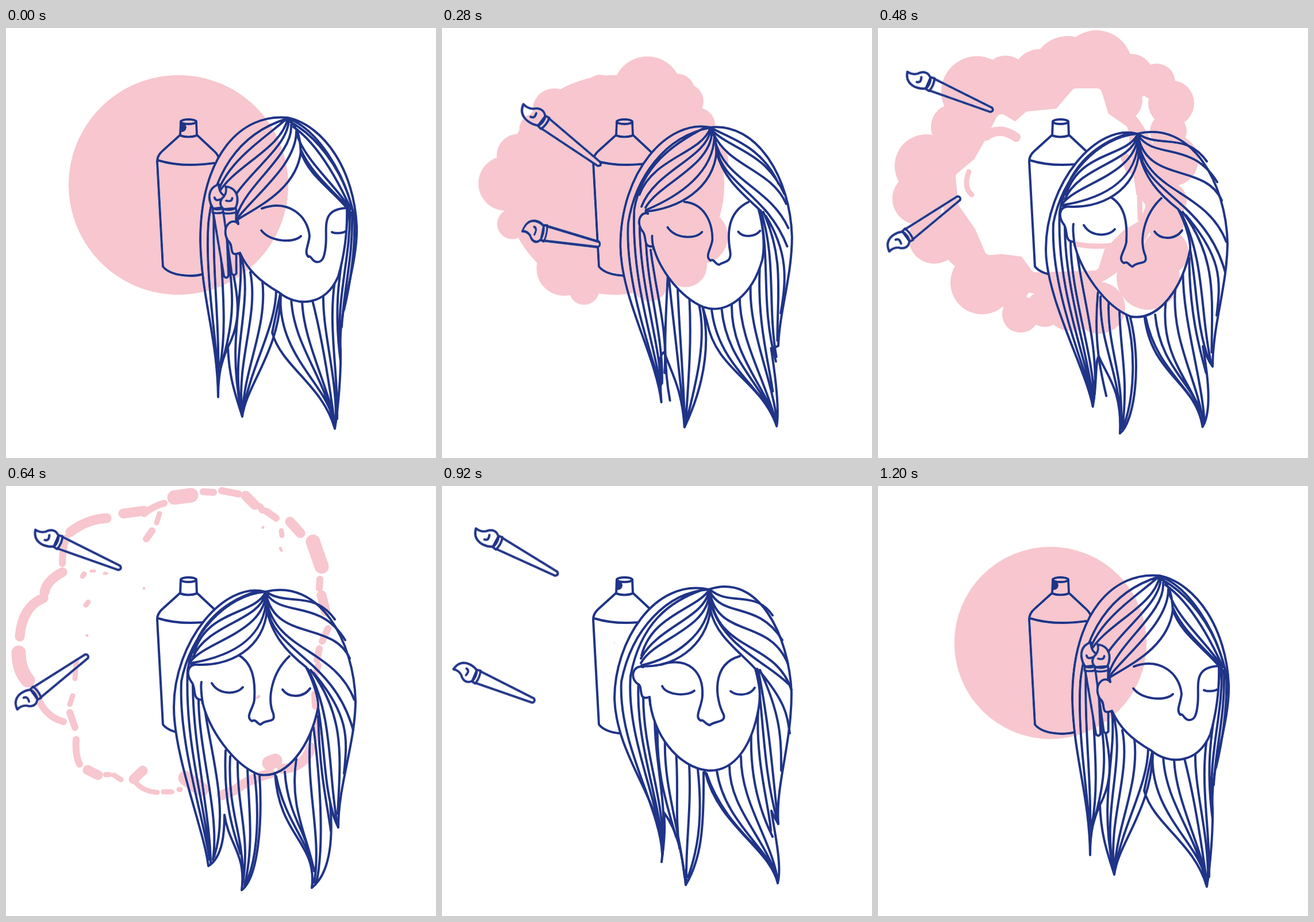
An HTML page without scripts for the animation above (1240 ms loop, 748x748 px).

```html
<!DOCTYPE html>
<html lang="en">
<head>
<meta charset="utf-8">
<title>Spray can and brushes</title>
<style>
html, body { margin: 0; height: 100%; overflow: hidden; background: #fff; }
svg { display: block; width: 100vw; height: 100vh; }
.ink { fill: none; stroke: #203488; stroke-width: 4; stroke-linecap: round; stroke-linejoin: round; }
.solid { fill: #fff; }
.ink path { vector-effect: non-scaling-stroke; }
.pink { fill: #f7c6ce; mix-blend-mode: darken; }
.puff { fill: none; stroke: #f7c6ce; stroke-linecap: round; stroke-linejoin: round; }
.mane, .left, .right, .crown, .part, .face, .look, .b1, .b2, .spot, .disc, .hole, .near, .far, .bits path {
  animation: 1240ms linear infinite;
}
.mane { animation-name: mane; }
.left { animation-name: left; }
.right { animation-name: right; }
.crown { animation-name: crown; }
.part { animation-name: part; }
.face { animation-name: face; }
.look { animation-name: look; }
.b1 { animation-name: b1; }
.b2 { animation-name: b2; }
.spot { animation-name: spot; }
.disc { animation-name: disc; transform-origin: 300px 273px; }
.hole { animation-name: hole; transform-origin: 290px 268px; }
.near { animation-name: near; transform-origin: 300px 273px; }
.far { animation-name: far; transform-origin: 290px 270px; }
.bits path { animation-name: bits; transform-origin: 288px 275px; }

/* hair: turned, front, swung, returning */
@keyframes mane {
  0%, 12.9%, 93.54%, to { animation-timing-function: steps(5); d: path("M490 156C410 148 338 220 338 370C340 470 368 540 369 642C369 600 375 580 386 555C388 610 400 640 411 676C418 620 478 560 478 458L463 530C480 590 550 620 572 697C578 660 583 600 582 560C581 545 582 520 585 505C588 470 612 400 610 345C606 250 555 170 490 156"); }
  29.03% { animation-timing-function: steps(7); d: path("M451 184C380 165 292 270 292 385C292 470 375 590 390 657C384 590 376 560 387 570C405 590 430 620 429 707C450 690 470 590 437 503L460 500C475 600 560 610 589 690C594 660 575 590 566 555C572 568 578 578 585 585C586 510 607 450 608 375C606 270 545 160 451 184"); }
  51.61% { animation-timing-function: steps(7); d: path("M451 184C380 165 292 270 292 385C292 470 345 600 352 661C378 645 380 600 380 572C388 625 418 640 410 703C440 680 446 580 441 503L468 500C475 610 542 620 532 699C568 670 568 600 564 552C568 570 574 586 578 594C578 520 607 450 608 375C606 270 545 160 451 184"); }
  74.19% { animation-timing-function: steps(6); d: path("M464 180C370 160 300 270 300 370C304 480 395 560 382 654C388 610 388 590 386 568C410 600 418 640 424 694C450 650 456 600 455 498L458 498C480 590 570 630 584 691C592 660 578 600 573 565C577 575 582 582 585 588C580 520 608 450 608 360C604 260 550 150 464 180"); }
}
@keyframes left {
  0%, 12.9%, 93.54%, to { animation-timing-function: steps(5); d: path("M488 158C400 185 360 260 352 340C346 430 366 540 369 610M488 158C440 200 372 240 362 310C358 420 372 520 369 600M372 350C376 450 385 520 372 590M385 385C395 460 400 500 375 585M390 395C400 460 415 500 386 555M407 392C415 470 385 540 408 660M410 400C430 480 390 560 409 665M425 425C440 500 400 580 411 670M446 440C455 520 415 590 412 665M470 455C470 520 425 590 413 665"); }
  29.03% { animation-timing-function: steps(7); d: path("M451 184C380 190 320 260 305 340C300 450 360 570 388 640M440 182C380 200 330 240 316 320C310 450 365 560 388 640M325 345C325 450 370 550 388 640M335 370C335 460 375 560 388 640M345 380C355 470 378 540 388 630M383 460C372 540 382 600 389 640M385 465C385 540 425 590 429 690M400 475C395 550 432 600 430 700M420 490C420 560 440 600 432 700M432 500C455 560 452 640 434 695"); }
  51.61% { animation-timing-function: steps(7); d: path("M451 184C380 190 320 260 305 340C300 450 345 580 354 650M440 182C380 200 330 240 316 320C310 450 350 570 355 650M325 345C325 450 355 570 356 655M335 370C335 460 372 570 360 650M345 380C352 450 390 560 362 645M382 460C378 550 395 600 408 640M390 470C385 560 410 600 412 670M403 480C402 560 425 610 412 690M420 490C422 560 432 620 415 695M432 498C440 560 440 640 418 690"); }
  74.19% { animation-timing-function: steps(6); d: path("M464 180C390 185 330 250 312 340C306 450 380 560 383 640M455 180C395 200 345 240 328 330C320 440 380 550 384 640M342 340C335 450 385 560 383 640M350 365C350 460 385 540 385 630M370 400C370 470 386 530 386 600M375 410C372 500 390 550 407 610M388 440C385 520 412 590 422 680M407 460C412 530 405 570 413 630M430 485C434 560 424 620 425 685M445 493C452 560 450 620 428 680"); }
}
@keyframes right {
  0%, 12.9%, 93.54%, to { animation-timing-function: steps(5); d: path("M478 458C470 560 545 610 566 670M496 470C500 550 550 600 568 680M515 470C515 540 560 620 571 685M532 470C545 520 560 600 572 690M552 460C550 530 575 600 574 685M572 440C560 520 578 600 576 680M595 315C592 390 565 450 582 580M598 316C600 400 575 460 581 560M602 320C604 400 588 450 584 520M606 330C608 380 600 440 588 490"); }
  29.03% { animation-timing-function: steps(7); d: path("M462 500C480 590 545 620 580 675M480 500C490 590 550 620 585 680M497 480C490 580 560 620 587 682M508 462C500 560 560 610 588 685M527 430C520 520 570 600 589 685M540 400C540 500 560 560 575 600M522 315C560 400 545 500 580 580M525 318C570 400 560 500 582 580M530 320C590 400 580 470 583 560M535 325C600 400 598 440 590 500"); }
  51.61% { animation-timing-function: steps(7); d: path("M470 505C485 580 520 610 533 660M485 497C490 570 520 600 528 640M505 475C492 560 525 610 536 670M530 430C520 520 550 610 536 690M535 420C545 500 555 620 540 690M543 400C545 500 560 560 565 600M522 315C560 400 545 500 572 580M525 318C570 400 560 500 576 585M530 320C590 400 582 470 577 570M535 325C598 400 594 440 588 500"); }
  74.19% { animation-timing-function: steps(6); d: path("M460 500C490 590 560 630 578 670M478 495C490 580 565 630 580 675M500 487C500 560 560 610 582 680M520 470C520 550 570 610 583 680M538 430C535 520 560 580 575 610M550 390C545 480 570 560 572 600M548 318C560 420 560 500 584 585M550 320C570 420 575 500 583 570M553 320C590 400 590 440 590 495M555 325C600 380 600 400 605 430"); }
}
@keyframes crown {
  0%, 12.9%, 93.54%, to { animation-timing-function: steps(5); d: path("M490 157C480 210 395 240 368 290M492 160C490 215 400 260 380 330M496 168C500 220 420 270 402 325M505 180C505 235 440 285 403 330"); }
  29.03%, 64.51% { animation-timing-function: steps(3); d: path("M451 186C430 225 350 215 327 290M451 188C440 235 350 240 325 298M452 190C445 255 350 270 322 304M453 195C450 260 400 295 322 308"); }
  74.19% { animation-timing-function: steps(6); d: path("M464 182C440 215 365 225 347 295M464 184C455 230 375 245 346 300M465 188C460 250 370 265 346 308M466 195C465 260 400 300 347 312"); }
}
@keyframes part {
  0%, 12.9%, 93.54%, to { animation-timing-function: steps(5); d: path("M490 157C540 175 590 250 606 330M494 163C535 185 585 240 604 320M500 172C540 200 575 260 600 315M506 185C520 230 570 270 597 312M513 212C530 250 560 275 595 312M490 157C510 175 512 195 513 220"); }
  29.03%, 64.51% { animation-timing-function: steps(3); d: path("M452 184C490 210 535 180 572 232M452 186C480 230 545 195 590 268M453 190C470 270 570 235 598 300M453 198C470 290 570 280 606 372M454 210C465 290 570 300 604 425M451 184C453 195 454 205 454 235"); }
  74.19% { animation-timing-function: steps(6); d: path("M466 180C500 210 545 180 575 225M466 184C490 230 550 200 592 268M467 190C485 265 570 230 602 310M468 198C485 290 580 270 608 355M469 208C490 280 570 310 603 345M464 180C466 195 467 205 468 235"); }
}
@keyframes face {
  0%, 12.9%, 93.54%, to { animation-timing-function: steps(5); d: path("M403 333C440 310 505 280 513 215C525 255 565 280 593 313C594 350 590 390 578 432C555 485 505 485 475 460C440 440 420 420 407 391C385 400 398 378 386 370C372 345 395 328 404 341Z"); }
  29.03%, 64.51% { animation-timing-function: steps(3); d: path("M322 310C390 318 450 280 454 215C462 260 490 290 522 315C535 340 544 370 543 385C530 450 490 510 440 502C395 485 350 420 341 372C322 372 332 350 322 340C312 325 318 312 328 311Z"); }
  74.19% { animation-timing-function: steps(6); d: path("M347 313C400 318 460 280 467 215C475 260 520 290 545 318C552 345 555 360 551 385C540 450 510 497 463 495C410 490 365 430 361 367C340 375 350 350 342 345C325 335 332 310 350 315Z"); }
}
@keyframes look {
  0%, 12.9%, 93.54%, to { animation-timing-function: steps(5); d: path("M445 314C490 298 525 325 528 362C526 380 518 390 526 398C530 394 532 406 540 407C550 408 554 400 556 380C560 350 545 315 593 313M444 352C460 372 500 375 513 362M567 355C572 358 585 357 590 354M404 392C405 392 406 393 407 395"); }
  29.03%, 64.51% { animation-timing-function: steps(3); d: path("M406 295C430 310 434 340 432 372C430 388 415 402 428 409C434 404 438 415 443 415C452 404 470 414 465 396C454 370 462 325 493 296M358 343C370 363 400 364 412 350M481 354C492 370 518 368 529 352M340 341C338 350 341 370 342 378"); }
  74.19% { animation-timing-function: steps(6); d: path("M380 311C430 295 455 325 453 365C452 385 438 402 450 408C455 405 458 415 466 416C475 408 494 412 490 398C475 370 468 310 518 296M383 348C390 365 428 366 439 356M502 357C512 365 535 366 544 351M361 367C361 370 362 375 362 380"); }
}

/* brushes */
@keyframes b1 {
  0%, 3.22%, 93.54%, to { animation-timing-function: steps(3); transform: translate(371px, 316px) rotate(84deg) scale(1, 1); }
  12.9% { animation-timing-function: steps(5); transform: translate(308px, 263px) rotate(59.5deg) scale(1.12, 1); }
  29.03% { animation-timing-function: steps(3); transform: translate(88px, 97px) rotate(22deg) scale(1, 1); }
  38.7%, 51.61% { animation-timing-function: steps(7); transform: translate(90px, 97px) rotate(23deg) scale(1, 1); }
  74.19% { animation-timing-function: steps(6); transform: translate(96px, 98px) rotate(28deg) scale(1, 1); }
}
@keyframes b2 {
  0%, 3.22%, 93.54%, to { animation-timing-function: steps(3); transform: translate(389px, 317px) rotate(86deg) scale(.95, -1); }
  12.9% { animation-timing-function: steps(5); transform: translate(346px, 350px) rotate(67deg) scale(.75, -1.3); }
  29.03% { animation-timing-function: steps(3); transform: translate(64px, 361px) rotate(-25deg) scale(.9, -1.1); }
  38.7%, 51.61% { animation-timing-function: steps(7); transform: translate(51px, 361px) rotate(-36deg) scale(.95, -1); }
  74.19% { animation-timing-function: steps(6); transform: translate(59px, 331px) rotate(23deg) scale(.93, -1); }
}
@keyframes spot {
  0%, 64.51%, to { animation-timing-function: step-end; opacity: 1; }
  16.12% { animation-timing-function: step-end; opacity: 0; }
}

/* spray: disc, cloud, ring, scraps */
@keyframes disc {
  0% { animation-timing-function: step-end; transform: scale(1); }
  41.93% { animation-timing-function: step-end; transform: scale(0); }
  74.19% { animation-timing-function: steps(8); transform: scale(.006); }
  to { transform: scale(1); }
}
@keyframes hole {
  0% { animation-timing-function: step-end; transform: scale(0); }
  29.03% { animation-timing-function: steps(3); transform: scale(.12); }
  38.7%, 41.93% { animation-timing-function: step-end; transform: scale(1); }
  74.19%, to { transform: scale(0); }
}
@keyframes near {
  0% { animation-timing-function: step-end; visibility: hidden; transform: scale(.7); }
  12.9% { animation-timing-function: steps(5); visibility: visible; transform: scale(.7); }
  29.03% { animation-timing-function: steps(2); visibility: visible; transform: scale(1); }
  35.47%, to { visibility: hidden; transform: scale(1.06); }
}
@keyframes far {
  0% { animation-timing-function: step-end; visibility: hidden; transform: scale(.96); }
  35.47% { animation-timing-function: step-end; visibility: visible; transform: scale(.97); }
  38.7% { animation-timing-function: step-end; visibility: visible; transform: scale(1); }
  41.93%, to { visibility: hidden; transform: scale(1); }
}
@keyframes bits {
  0% { animation-timing-function: step-end; visibility: hidden; stroke-width: 0px; transform: scale(.9); }
  41.93% { animation-timing-function: steps(3); visibility: visible; stroke-width: calc(var(--w) * 3); transform: scale(.9); }
  51.61% { animation-timing-function: steps(4); visibility: visible; stroke-width: var(--w); transform: scale(1); }
  64.51%, to { visibility: hidden; stroke-width: 0px; transform: scale(1.03); }
}
</style>
</head>
<body>
<svg viewBox="0 0 748 748">
  <defs>
    <g id="brush">
      <path d="M4-11L116-4Q122 0 116 4L4 11Z"/>
      <path d="M-3-10C-10-18-20-16-26-8Q-34-2-44-4Q-40 14-22 15Q-10 15-3 10Z"/>
      <path d="M-3-11Q2 0-3 11L4 12Q8 0 4-12ZM-22 6Q-14 5-18-5"/>
    </g>
    <mask id="ring" maskUnits="userSpaceOnUse" x="0" y="0" width="748" height="748">
      <path fill="#fff" d="M0 0H748V748H0Z"/>
      <path class="hole" stroke="#000" stroke-width="20" stroke-linejoin="round" d="M215 160L240 175L262 155L315 150L345 115L380 115L392 155L425 178L432 240L440 295L455 310L448 328L420 345L385 380L375 412L275 415L255 388L215 383L195 385L178 345L150 305L145 260L175 235L195 200Z"/>
    </mask>
  </defs>

  <g class="ink">
    <path d="M303 186L272 214Q263 222 263 232L273 415Q285 430 320 431Q345 431 361 420L371 232Q371 222 362 214L332 186M264 230Q305 243 362 235"/>
    <path d="M304 163L303 187Q317 192 332 187L331 163"/>
    <ellipse cx="317.500" cy="163" rx="13.500" ry="4"/>
    <path class="spot" fill="#203488" d="M305 168Q312 167 312 173Q311 179 305 179Z"/>
    <path class="mane solid"/>
    <path class="left"/>
    <path class="right"/>
    <path class="crown"/>
    <path class="part"/>
    <g class="solid">
      <use class="b1" href="#brush"/>
      <use class="b2" href="#brush"/>
    </g>
    <path class="face solid"/>
    <path class="look"/>
  </g>

  <g class="pink">
    <g mask="url(#ring)">
      <circle class="disc" cx="300" cy="273" r="191"/>
      <g class="puff near">
        <path stroke-width="136" d="M365 87h0"/>
        <path stroke-width="108" d="M85 270h0M200 438h0M470 375h0"/>
        <path stroke-width="86" d="M181 125h0M110 215h0M440 432h0"/>
        <path stroke-width="70" d="M424 88h0M441 108h0M464 155h0M490 225h0M370 468h0M163 390h0M480 300h0"/>
        <path stroke-width="60" d="M272 85h0M240 480h0M98 350h0M142 162h0M300 460h0"/>
        <path stroke-width="40" d="M213 97h0"/>
      </g>
      <g class="puff far">
        <path stroke-width="124" d="M172 111h0M380 66h0M330 76h0"/>
        <path stroke-width="110" d="M84 240h0M181 443h0M470 435h0"/>
        <path stroke-width="90" d="M280 82h0M70 297h0M98 365h0M222 440h0M335 482h0M385 487h0M512 230h0"/>
        <path stroke-width="80" d="M222 88h0M510 131h0M132 172h0M155 380h0M420 125h0M500 390h0M440 85h0"/>
        <path stroke-width="64" d="M485 94h0M248 498h0M290 488h0M505 300h0M505 180h0M500 340h0"/>
      </g>
    </g>
    <g class="puff far">
      <path stroke-width="16" d="M188 188Q212 170 240 190M430 225L438 245"/>
      <path stroke-width="9" d="M158 250Q148 278 163 290M455 295L456 332M345 376Q375 382 410 378"/>
    </g>
    <g class="puff bits">
      <path style="--w:25px" d="M293 20L322 16M534 97L549 140M458 482L468 478M312 508L340 528M22 290Q22 320 38 338"/>
      <path style="--w:17px" d="M494 62L512 82M417 17L433 33M549 190L556 218M530 455Q520 490 480 492M460 500Q420 510 400 528L375 538M222 510L238 495M142 494L160 503M24 262Q28 210 65 195M67 185Q70 165 98 150M112 80Q140 58 175 56M204 48L240 43"/>
      <path style="--w:12px" d="M343 10L361 11M375 8L405 14M453 44L470 56M442 36L446 42M546 162L545 178M560 248L550 270M545 283L541 302M543 312L539 325M537 362L538 383M541 412L541 438M122 441Q120 468 128 484M111 394L120 420M100 410Q62 400 50 352M98 135Q98 110 105 90M240 48Q258 34 275 30M244 92L254 78"/>
      <path style="--w:9px" d="M262 64L267 48M274 532h14M225 515Q238 531 263 533M188 503L200 511M173 502h7M116 365L111 380M120 335L122 305M133 157L136 153M139 207L143 202M479 78L480 86M301 528h2"/>
      <path style="--w:5px" d="M148 148h6M171 152h4M477 108L479 112M437 368L440 366M141 260h0M240 178h0M447 72h0"/>
    </g>
  </g>
</svg>
</body>
</html>
```
